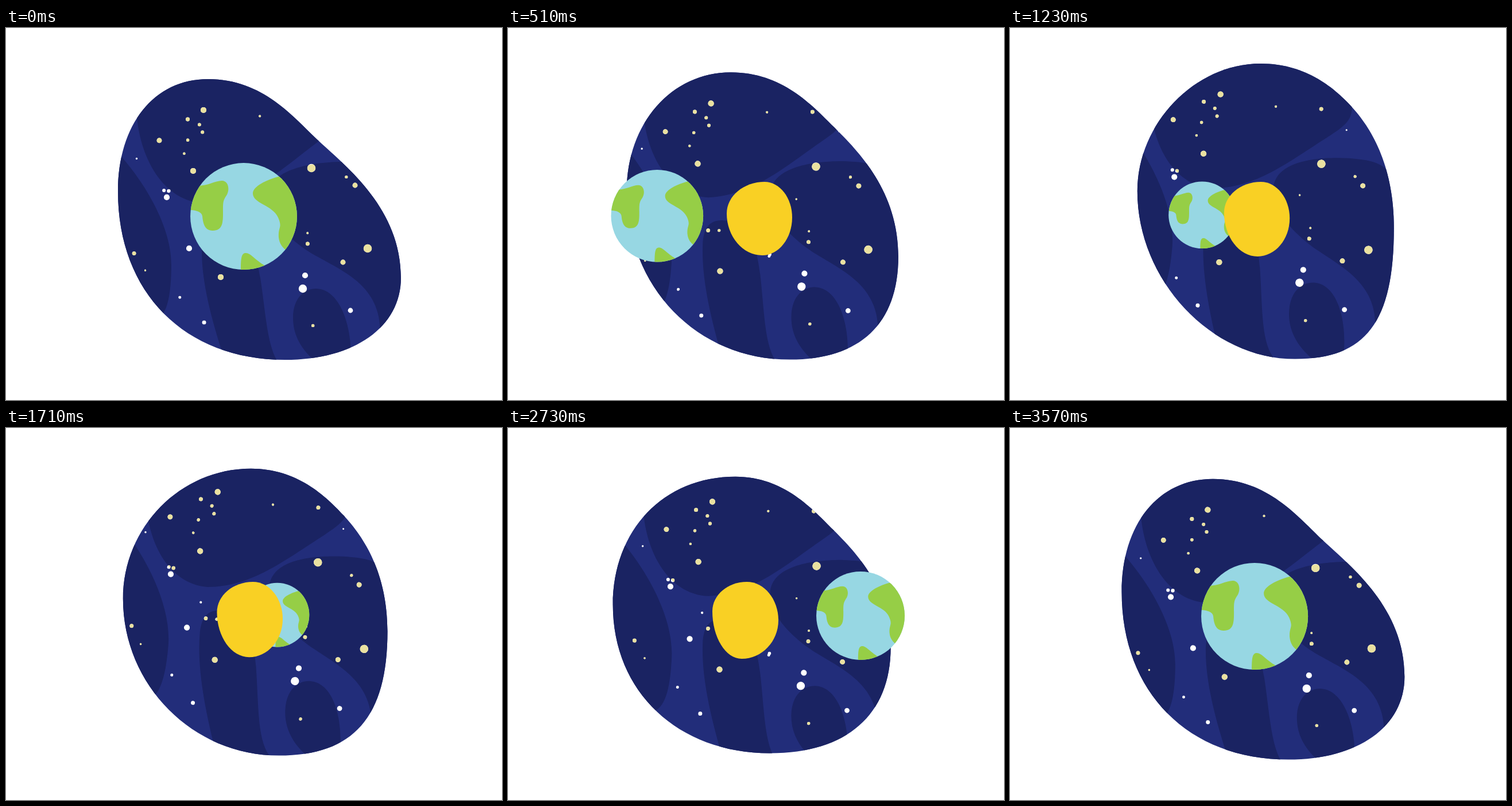
These frames come from a looping animation (864 px wide and 648 px high, 3600 ms). An HTML page with a canvas:

```html
<!DOCTYPE html>
<html lang="en">
<head>
<meta charset="utf-8">
<title>Orbit</title>
<style>
  html, body { margin: 0; width: 100%; height: 100%; overflow: hidden; background: #fff; }
  canvas { display: block; width: 864px; height: 648px; }
</style>
</head>
<body>
<canvas width="864" height="648"></canvas>
<script>
const LOOP = 3600;
const ctx = document.querySelector('canvas').getContext('2d');

// Sky outlines: top, shoulder, right, bottom, left, then roundness of the left and lower right
const skyPoses = [
  [352, 89, 545, 197, 688, 435, 486, 578, 195, 285, .6, .6],
  [437, 61.5, 598, 139, 669, 348, 498, 577, 223, 283, .53, .72],
  [413, 83, 575, 170, 658.5, 362, 445, 562, 178, 317, .58, .65]
];

// Sun outlines: top, right, bottom, left
const sunStart = [447, 268, 495, 330, 443, 396, 381, 323];
const sunEnd = [416, 268, 471, 335, 407, 402, 356, 319];

const clouds = new Path2D(`
  M227 140C230 225 275 305 348 305C425 298 475 250 545 197C563 183 580 170 580 150V0H227Z
  M190 212C240 265 288 345 288 412C288 460 282 500 262 508C240 516 200 520 120 520V170Z
  M455 295C456 250 520 235 580 233C620 233 640 234 660 258L740 300V530H652C652 450 590 425 540 397C510 380 455 340 455 295Z
  M341 388C341 360 350 344 375 344C425 344 436 395 443 435C453 500 455 560 478 588L500 620L392 610C362 525 341 450 341 388Z
  M500 505C500 470 520 454 540 454C578 454 601 510 601 570V600H570C520 575 500 540 500 505Z`);

// Local to a globe of radius 93
const land = new Path2D(`
  M-80-53C-62-53-50-62-38-62C-27-62-24-48-29-38C-36-27-36-26-36-8C-36 10-36 25-54 25C-69 25-71 10-72 0C-73-8-84-11-95-11V-53Z
  M64-70C40-64 16-52 16-40C16-22 50-20 60 2C68 20 60 18 61 36C62 48 68 55 75 60H110V-70Z
  M-5 95C-5 72-4 64 4 64C12 64 20 76 37 86V100H-5Z`);

const stars = new Path2D();
function addStar(x, y, r) {
  stars.moveTo(x + r, y);
  stars.arc(x, y, r, 0, 7);
}
[[532, 244], [517, 454], [630, 384]].forEach(([x, y]) => addStar(x, y, 7.2));
[[344, 143], [326, 249], [280, 295], [319, 384], [374, 434], [521, 431]].forEach(([x, y]) => addStar(x, y, 5.1));
[[267, 196], [608, 274], [587, 408], [600, 492]].forEach(([x, y]) => addStar(x, y, 4.4));

const random = n => Math.abs(Math.sin(n * 12.9898) * 43758.5453) % 1;
for (let i = 1; i <= 26; i++) {
  const angle = random(i) * 2 * Math.PI, far = 235 * Math.sqrt(random(i + 50));
  addStar(430 + far * Math.cos(angle), 340 + far * Math.sin(angle), 1.5 + 2 * random(i + 100));
}

const rad = deg => deg * Math.PI / 180;
const mix = (a, b, f) => a.map((v, i) => v + (b[i] - v) * f);

// Degrees climbed at one rate per second and lost at another, with a rounded peak
function sway(t, up, down) {
  const rise = up * t / 1000, fall = down * (LOOP - t) / 1000;
  return rise * fall / (rise ** 4 + fall ** 4) ** .25;
}

function fill(color, path) {
  ctx.fillStyle = color;
  ctx.fill(path);
}

// Quarter of an oval; a flat one leaves horizontally and arrives vertically
function quarter(path, x0, y0, x1, y1, k, flat) {
  const dx = (x1 - x0) * k, dy = (y1 - y0) * k;
  if (flat) path.bezierCurveTo(x0 + dx, y0, x1, y1 - dy, x1, y1);
  else path.bezierCurveTo(x0, y0 + dy, x1 - dx, y1, x1, y1);
}

function skyOutline(t) {
  const step = t / LOOP * 3, i = Math.floor(step);
  const [tx, ty, nx, ny, rx, ry, bx, by, lx, ly, left, lower] =
    mix(skyPoses[i], skyPoses[(i + 1) % 3], step - i);
  const slopeX = rx - tx, slopeY = (ry - ty) * .9;
  const path = new Path2D();
  path.moveTo(tx, ty);
  path.bezierCurveTo((tx + nx) / 2, ty, nx - slopeX * .13, ny - slopeY * .13, nx, ny);
  path.bezierCurveTo(nx + slopeX * .15, ny + slopeY * .15, rx, (ry + ny) / 2, rx, ry);
  quarter(path, rx, ry, bx, by, lower, false);
  quarter(path, bx, by, lx, ly, left, true);
  quarter(path, lx, ly, tx, ty, left, false);
  return path;
}

function turn(degrees, shift) {
  ctx.setTransform(1, 0, 0, 1, 587, 335 + shift);
  ctx.rotate(rad(degrees));
  ctx.translate(-587, -335);
}

function drawSky(t) {
  const swell = Math.sin(Math.PI * t / LOOP);
  const turnClouds = () => turn(sway(t, 4.3, 2.55), -9 * swell ** 3);
  const turnStars = () => turn(sway(t, 5.45, 3.97), -4 * swell ** 6);
  const outline = skyOutline(t);
  ctx.save();
  fill('#222d7a', outline);
  ctx.clip(outline);
  turnClouds();
  fill('#1a2362', clouds);
  turnStars();
  fill('#fff', stars);
  turnClouds();
  ctx.clip(clouds);
  turnStars();
  fill('#eae1a0', stars);
  ctx.restore();
}

function drawSun(t) {
  const [tx, ty, rx, ry, bx, by, lx, ly] = mix(sunStart, sunEnd, (t - 510) / 2220);
  const sun = new Path2D();
  sun.moveTo(tx, ty);
  quarter(sun, tx, ty, rx, ry, .55, true);
  quarter(sun, rx, ry, bx, by, .55, false);
  quarter(sun, bx, by, lx, ly, .55, true);
  quarter(sun, lx, ly, tx, ty, .55, false);
  fill('#f9d024', sun);
}

// Uneven progress around the orbit
function orbitAngle(t) {
  const a = 2 * Math.PI * t / LOOP;
  return a + rad(15.5 - 11 * Math.cos(a) - 5 * Math.sin(a) + 2 * Math.sin(2 * a));
}

function drawEarth(angle) {
  const r = 1 / (.0144 - .00365 * Math.cos(angle));
  const disc = new Path2D();
  disc.arc(0, 0, 93, 0, 7);
  ctx.save();
  ctx.translate(433 - 2.55 * r * Math.sin(angle), 321.9 + .066 * r);
  ctx.scale(r / 93, r / 93);
  fill('#97d7e3', disc);
  ctx.clip(disc);
  fill('#96ce46', land);
  ctx.restore();
}

function draw(t) {
  const angle = orbitAngle(t);
  const behind = Math.cos(angle) < 0;
  ctx.clearRect(0, 0, 864, 648);
  drawSky(t);
  if (behind) drawEarth(angle);
  drawSun(t);
  if (!behind) drawEarth(angle);
}

const start = performance.now();
function loop() {
  draw((performance.now() - start) % LOOP);
  requestAnimationFrame(loop);
}
loop();
</script>
</body>
</html>
```
